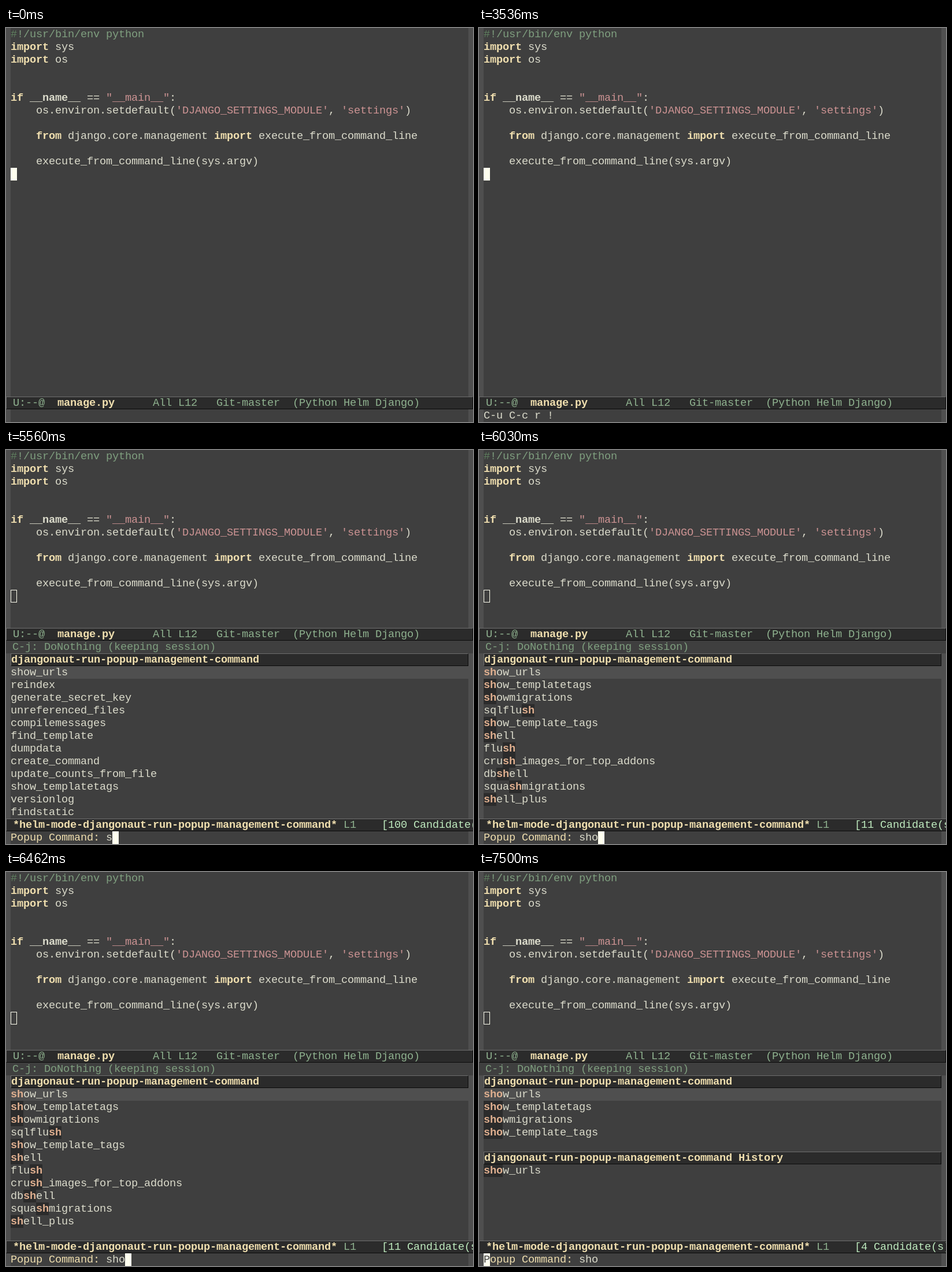
An HTML page for the animation above (8000 ms loop, 808 px wide and 682 px high).

```html
<!DOCTYPE html>
<html lang="en">
<head>
<meta charset="utf-8">
<title>Editor popup command</title>
<style>
  html, body { margin: 0; width: 100%; height: 100%; overflow: hidden; background: #3f3f3f; }
  #stage {
    position: relative; width: 808px; height: 682px; overflow: hidden;
    background: #3f3f3f; color: #dcdccc;
    font: 18.667px/22px "Liberation Mono", monospace;
    letter-spacing: calc(11px - 1ch); /* snap glyphs to the 11px character grid */
    font-variant-ligatures: none;
    white-space: pre;
  }
  #stage::before, #stage::after {
    content: ""; position: absolute; top: 0; bottom: 0; width: 8px; background: #4f4f4f;
  }
  #stage::before { left: 0; }
  #stage::after { right: 0; }
  b { color: #f0dfaf; }
  .builtin { color: inherit; }
  .comment { color: #7f9f7f; }
  .comment i { color: #5f7f5f; font-style: normal; }
  .string { color: #cc9393; }
  .prompt { color: #f0dfaf; }
  .count { color: #bfebbf; }

  .row, .cursor { position: absolute; left: 8px; top: calc(var(--r) * 22px); height: 22px; }
  .row { width: 792px; box-sizing: border-box; overflow: hidden; z-index: 1; }
  .full { left: 0; width: 808px; }
  .bar {
    background: #2b2b2b; line-height: 20px; color: #8fb28f;
    border: 1px solid; border-color: #6e6e6e #0b0b0b #0b0b0b #6e6e6e;
  }
  .open { border-right: 0; }
  .help { background: #3f3f3f; color: #7f9f7f; }
  .selected { background: #4f4f4f; }
  mark { background: #2b2b2b; color: #dfaf8f; font-weight: bold; display: inline-block; height: 22px; }
  .selected mark { background: none; }

  .cursor { width: 11px; box-sizing: border-box; background: #ffffef; color: #3f3f3f; z-index: 2; }
  .hollow { background: none; border: 1px solid #ffffef; }

  .phase { visibility: hidden; animation: 8s step-end infinite; }
  #edit { animation-name: edit; }
  #echo { animation-name: echo; }
  #popup { animation-name: popup; }
  #list0 { animation-name: list0; }
  #list1 { animation-name: list1; }
  #list2 { animation-name: list2; }
  #list3 { animation-name: list3; }
  @keyframes edit { 0% { visibility: visible } 69.5%, 100% { visibility: hidden } }
  @keyframes echo { 0% { visibility: hidden } 6.25% { visibility: visible } 69.5%, 100% { visibility: hidden } }
  @keyframes popup { 0% { visibility: hidden } 69.5%, 100% { visibility: visible } }
  @keyframes list0 { 0% { visibility: hidden } 69.5% { visibility: visible } 72.625%, 100% { visibility: hidden } }
  @keyframes list1 { 0% { visibility: hidden } 72.625% { visibility: visible } 75.375%, 100% { visibility: hidden } }
  @keyframes list2 { 0% { visibility: hidden } 75.375% { visibility: visible } 84.375%, 100% { visibility: hidden } }
  @keyframes list3 { 0% { visibility: hidden } 84.375%, 100% { visibility: visible } }
</style>
</head>
<body>
<div id="stage"></div>
<script>
const stage = document.getElementById('stage');
const COMMAND = 'djangonaut-run-popup-management-command';

const row = (r, html, cls = '') => `<div class="row ${cls}" style="--r:${r}">${html}</div>`;
const cursor = (r, col, char = '', cls = '') =>
  `<div class="cursor ${cls}" style="--r:${r};left:${8 + col * 11}px">${char}</div>`;
const phase = (id, html) => `<div class="phase" id="${id}">${html}</div>`;

const code = [
  '<span class="comment"><i>#</i>!/usr/bin/env python</span>',
  '<b>import</b> sys',
  '<b>import</b> os',
  '',
  '',
  '<b>if</b> <b class="builtin">__name__</b> == <span class="string">"__main__"</span>:',
  `    os.environ.setdefault(<span class="string">'DJANGO_SETTINGS_MODULE'</span>, <span class="string">'settings'</span>)`,
  '',
  '    <b>from</b> django.core.management <b>import</b> execute_from_command_line',
  '',
  '    execute_from_command_line(sys.argv)'
].map((line, r) => row(r, line)).join('');

const fileBar = r => row(r,
  ' U:--@  <b>manage.py</b>      All L12   Git-master  (Python Helm Django)', 'full bar');
const title = (r, text) => row(r, `<b>${text}</b>`, 'bar');

const lists = [
  { typed: 's', match: '', count: 100,
    names: 'show_urls reindex generate_secret_key unreferenced_files compilemessages find_template dumpdata create_command update_counts_from_file show_templatetags versionlog findstatic' },
  { typed: 'sh', match: 's', count: 98,
    names: 'show_urls generate_secret_key unreferenced_files compilemessages update_counts_from_file show_templatetags versionlog findstatic sqlcustom runscript sqldsn update_permissions' },
  { typed: 'sho', match: 'sh', count: 11,
    names: 'show_urls show_templatetags showmigrations sqlflush show_template_tags shell flush crush_images_for_top_addons dbshell squashmigrations shell_plus' },
  { typed: 'sho', match: 'sho', count: 4, history: 'show_urls',
    names: 'show_urls show_templatetags showmigrations show_template_tags' }
];

const highlight = (name, match) =>
  match ? name.replaceAll(match, `<mark>${match}</mark>`) : name;

function popupList({ typed, match, count, names, history }, i) {
  let html = names.split(' ')
    .map((name, n) => row(17 + n, highlight(name, match), n ? '' : 'selected')).join('');
  if (history) html += title(22, COMMAND + ' History') + row(23, highlight(history, match));
  html += row(29, ` <b>*helm-mode-${COMMAND}*</b> L1    <span class="count">[${count} Candidate(s)]</span>`, 'full bar open');
  html += row(30, `<span class="prompt">Popup Command: </span>${typed}`);
  html += history ? cursor(30, 0, 'P') : cursor(30, 15 + typed.length);
  return phase('list' + i, html);
}

stage.innerHTML = code
  + phase('edit', cursor(11, 0) + fileBar(29))
  + phase('echo', row(30, 'C-u C-c r !'))
  + phase('popup', cursor(11, 0, '', 'hollow') + fileBar(14)
    + row(15, ' C-j: DoNothing (keeping session)', 'full help') + title(16, COMMAND))
  + lists.map(popupList).join('');
</script>
</body>
</html>
```
